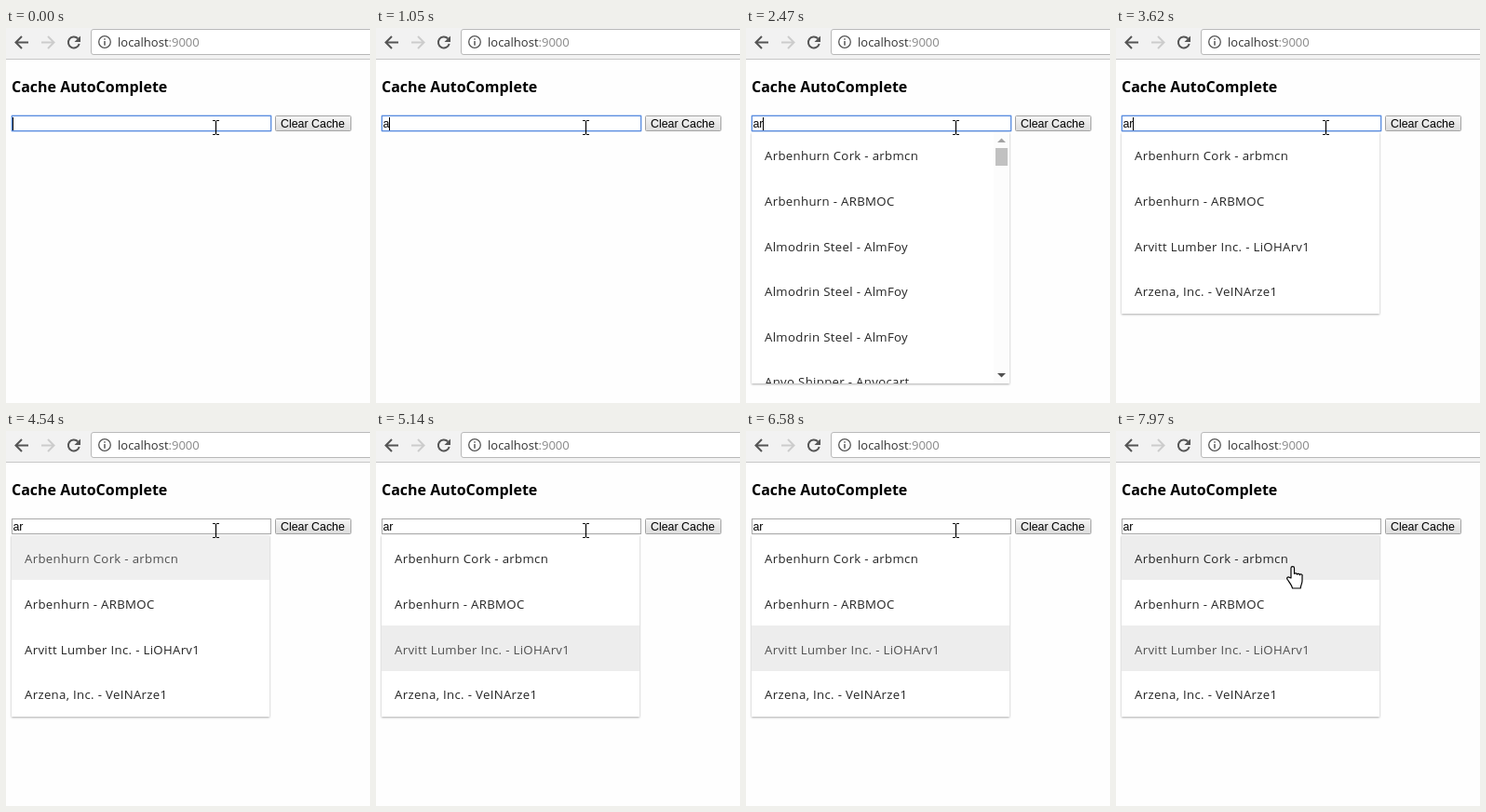
An HTML page for the animation above (8 s loop, 391 by 403 pixels).

```html
<!DOCTYPE html>
<html lang="en">
<head>
<meta charset="utf-8">
<title>Cache AutoComplete</title>
<style>
  html, body { margin: 0; width: 100%; height: 100%; overflow: hidden; background: #fefefe; }
  svg { display: block; }
  text { white-space: pre; }
  .url { font: 13px "Open Sans", "Noto Sans", sans-serif; fill: #333; }
  .title { font: 700 16px "Open Sans", "Noto Sans", sans-serif; fill: #000; }
  .control { font: 12.4px "Liberation Sans", Arial, sans-serif; fill: #000; }
  .list text { font: 13.2px "Open Sans", "Noto Sans", sans-serif; letter-spacing: .33px; fill: #242424; }
  .panel { fill: #fff; filter: drop-shadow(0 1px 1px rgba(0, 0, 0, .32)); }
  .shade { fill: #ededed; opacity: 0; }
  .icon { fill: none; stroke: #555; stroke-width: 2; }

  /* One loop is 8 s, so 1% is 80 ms. */
  .step { animation: 8s step-end infinite; }
  .shade, .cursor { animation: 8s linear infinite; }

  .focus { animation-name: focus; }
  .caret { animation-name: caret; }
  .key-a { animation-name: key-a; }
  .key-r { animation-name: key-r; }
  .long { animation-name: long; }
  .short { animation-name: short; }
  .list .label1 { animation-name: label1; }
  .list .label2 { animation-name: label2; }
  .list .label3 { animation-name: label3; }
  .shade1 { animation-name: shade1; }
  .shade2 { animation-name: shade2; }
  .shade3 { animation-name: shade3; }
  .cursor { animation-name: move; }
  .beam { animation-name: beam; }
  .hand { animation-name: hand; }

  @keyframes focus { 0% { opacity: 1 } 55.25%, 100% { opacity: 0 } }
  @keyframes caret {
    0% { opacity: 1; transform: translateX(0) }
    5.375% { opacity: 0; transform: translateX(0) }
    12.375% { opacity: 1; transform: translateX(0) }
    13.125% { opacity: 1; transform: translateX(7px) }
    22.375% { opacity: 0; transform: translateX(7px) }
    28.5% { opacity: 1; transform: translateX(7px) }
    30.875% { opacity: 1; transform: translateX(11px) }
    39% { opacity: 0; transform: translateX(11px) }
    45.25% { opacity: 1; transform: translateX(11px) }
    52.25%, 100% { opacity: 0; transform: translateX(11px) }
  }
  @keyframes key-a { 0% { opacity: 0 } 13.125%, 100% { opacity: 1 } }
  @keyframes key-r { 0% { opacity: 0 } 30.875%, 100% { opacity: 1 } }
  @keyframes long { 0% { opacity: 0 } 15.5% { opacity: 1 } 32.5%, 100% { opacity: 0 } }
  @keyframes short { 0% { opacity: 0 } 32.5%, 100% { opacity: 1 } }

  @keyframes label1 {
    0%, 59.75%, 77.875%, 100% { fill: #242424 }
    55.25%, 73.375% { fill: #505050 }
  }
  @keyframes label2 {
    0%, 62%, 73.375%, 80.125%, 100% { fill: #242424 }
    59.75%, 69.75%, 77.875% { fill: #505050 }
  }
  @keyframes label3 {
    0%, 69.75% { fill: #242424 }
    62%, 80.125%, 100% { fill: #505050 }
  }
  @keyframes shade1 {
    0%, 55.25%, 62%, 73.375%, 80.125%, 97.5% { opacity: 0 }
    57%, 59.75%, 75.625%, 77.875%, 99.5%, 100% { opacity: 1 }
  }
  @keyframes shade2 {
    0%, 59.75%, 64.25%, 69.75%, 75.625%, 77.875%, 82.25%, 100% { opacity: 0 }
    62%, 71.125%, 73.375%, 80.125% { opacity: 1 }
  }
  @keyframes shade3 {
    0%, 62%, 71.625%, 80.125% { opacity: 0 }
    64.25%, 69.75%, 82.25%, 100% { opacity: 1 }
  }

  @keyframes move {
    0%, 97% { transform: translate(225px, 107px) }
    99.6%, 100% { transform: translate(190px, 146px) }
  }
  @keyframes beam { 0% { opacity: 1 } 97.5%, 100% { opacity: 0 } }
  @keyframes hand { 0% { opacity: 0 } 97.5%, 100% { opacity: 1 } }
</style>
</head>
<body>
<svg width="391" height="403" viewBox="0 0 391 403">
  <defs>
    <linearGradient id="face" x2="0" y2="1">
      <stop stop-color="#f6f6f6"/><stop offset="1" stop-color="#dcdcdc"/>
    </linearGradient>
    <clipPath id="view"><path d="M6 112H283V382H6z"/></clipPath>
  </defs>

  <!-- Browser bar -->
  <path d="M0 0H391V33H0z" fill="#f2f2f2"/>
  <path d="M0 33.5H391" stroke="#c6c6c6"/>
  <rect x="91.5" y="1.5" width="320" height="27" rx="2.5" fill="#fff" stroke="#b8b8b8"/>
  <path class="icon" d="M24 15.5H11M17 9L10.5 15.5L17 22"/>
  <path class="icon" style="stroke:#ccc" d="M38 15.5H51M45 9L51.5 15.5L45 22"/>
  <path class="icon" d="M77.2 11.2A6 6 0 1 0 78.7 17"/>
  <path d="M80 8.5V15H73.5z" fill="#555"/>
  <circle class="icon" cx="106" cy="15" r="6.3" style="stroke-width:1.3"/>
  <path class="icon" style="stroke-width:1.5" d="M106 11.3V12.8M106 14V18.7"/>
  <text class="url" x="120" y="20">localhost<tspan fill="#888">:9000</tspan></text>

  <!-- Page -->
  <text class="title" x="6" y="69">Cache AutoComplete</text>
  <rect x="6.5" y="94.5" width="278" height="16" fill="#fff" stroke="#a9a9a9"/>
  <g class="step focus" fill="none" stroke="#5a8de0">
    <rect x="5.5" y="93.5" width="280" height="18" rx="1.5" stroke-opacity=".35"/>
    <rect x="6.5" y="94.5" width="278" height="16"/>
  </g>
  <text class="control step key-a" x="7.4" y="107">a</text>
  <text class="control step key-r" x="14.3" y="107">r</text>
  <path class="step caret" d="M7.5 96V110" stroke="#000"/>
  <rect x="289.5" y="94.5" width="81" height="16" rx="1" fill="url(#face)" stroke="#a3a3a3"/>
  <text class="control" x="295" y="107">Clear Cache</text>

  <g class="list step long">
    <path class="panel" d="M6 112H283V382H6z"/>
    <g clip-path="url(#view)">
      <text x="20" y="142">Arbenhurn Cork - arbmcn</text>
      <text x="20" y="191">Arbenhurn - ARBMOC</text>
      <text x="20" y="240">Almodrin Steel - AlmFoy</text>
      <text x="20" y="288">Almodrin Steel - AlmFoy</text>
      <text x="20" y="337">Almodrin Steel - AlmFoy</text>
      <text x="20" y="385">Anvo Shipper - Anvocart</text>
    </g>
    <path d="M266 112H283V382H266z" fill="#fcfcfc"/>
    <path d="M268 129H281V148H268z" fill="#c1c1c1"/>
    <path d="M270 123L274.5 118.5L279 123z" fill="#a3a3a3"/>
    <path d="M270 371L274.5 375.5L279 371z" fill="#505050"/>
  </g>

  <g class="list step short">
    <path class="panel" d="M6 112H283V307H6z"/>
    <path class="shade shade1" d="M6 112H283V160H6z"/>
    <path class="shade shade2" d="M6 160H283V209H6z"/>
    <path class="shade shade3" d="M6 209H283V258H6z"/>
    <text class="step label1" x="20" y="142">Arbenhurn Cork - arbmcn</text>
    <text class="step label2" x="20" y="191">Arbenhurn - ARBMOC</text>
    <text class="step label3" x="20" y="240">Arvitt Lumber Inc. - LiOHArv1</text>
    <text x="20" y="288">Arzena, Inc. - VeINArze1</text>
  </g>

  <!-- Pointer, its hot spot at 0,0 -->
  <g class="cursor">
    <path class="step beam" d="M-3 -7.5H0M1 -7.5H4M.5 -7V7M-3 7.5H0M1 7.5H4" fill="none" stroke="#000" stroke-width="1.2"/>
    <path class="step hand" d="M-2 12V1.3a1.75 1.75 0 0 1 3.5 0V7.5a1.7 1.7 0 0 1 3 .6a1.5 1.5 0 0 1 2.8 .7a1.4 1.4 0 0 1 2.7 1V15c0 3-1.5 4.5-1.8 8H-.5C-1 20-4 16.5-6 13.3c-1-1.8 1-3 2.2-1.9z" fill="#fff" stroke="#000" stroke-width="1.2" stroke-linejoin="round"/>
  </g>
</svg>
</body>
</html>
```
